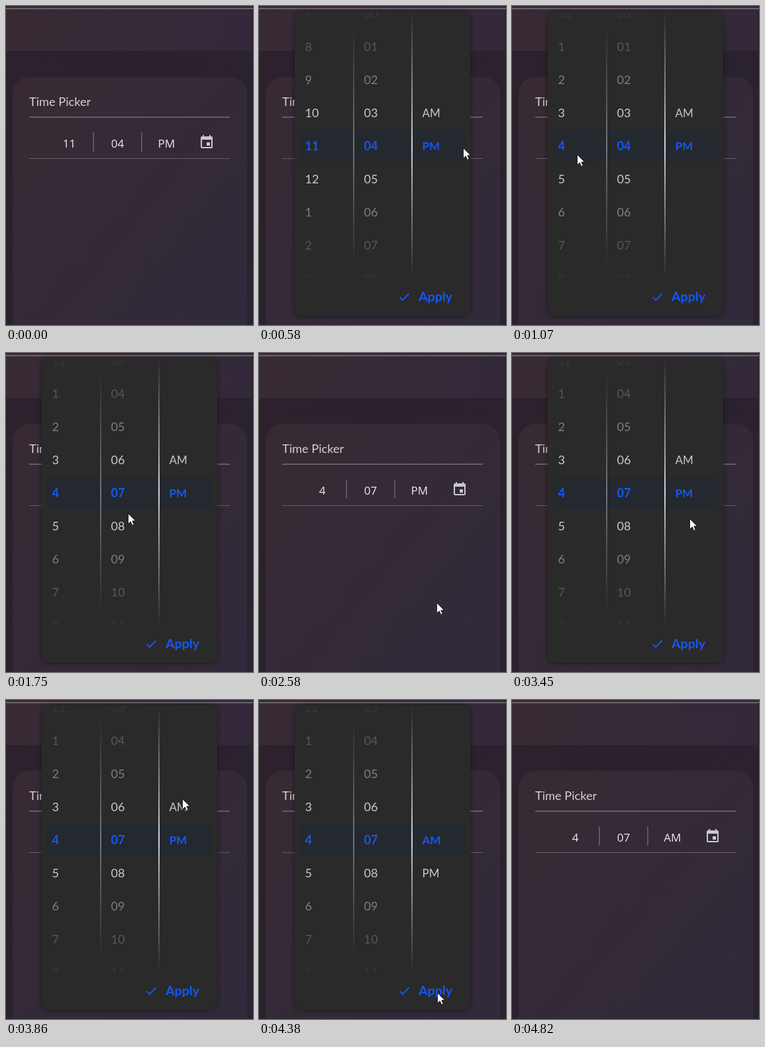
Animation of 373x482 px, one loop 5380 ms. Source, as an HTML page:

```html
<!DOCTYPE html>
<html lang="en">
<head>
<meta charset="utf-8">
<title>Time Picker</title>
<style>
html, body { margin: 0; width: 100%; height: 100%; overflow: hidden; background: #2a202c; }
svg { display: block; width: 373px; height: 482px; }
text { font-family: Lato, sans-serif; }
.field text { font: 17px "Open Sans", sans-serif; fill: #eeeaf0; text-anchor: middle; }
.wheel text { font-size: 18px; fill: #e4e4e4; }
.wheel text.on { font-weight: 700; fill: #1557f5; }
.wheel .half text { font-size: 17px; }
</style>
</head>
<body>
<svg viewBox="0 0 373 482">
  <defs>
    <linearGradient id="page" x2="1" y2="1">
      <stop stop-color="#2c212c"/><stop offset="1" stop-color="#2a2231"/>
    </linearGradient>
    <linearGradient id="bar" x2="1">
      <stop stop-color="#382b34"/><stop offset="1" stop-color="#33293a"/>
    </linearGradient>
    <linearGradient id="card" x2="1" y2="1">
      <stop stop-color="#372a33"/><stop offset="1" stop-color="#312a3b"/>
    </linearGradient>
    <linearGradient id="rule" x2="0" y2="1">
      <stop stop-color="#fff" stop-opacity="0"/>
      <stop offset=".5" stop-color="#fff"/>
      <stop offset="1" stop-color="#fff" stop-opacity="0"/>
    </linearGradient>
    <filter id="shade" x="-10%" y="-10%" width="120%" height="120%">
      <feDropShadow dx="0" dy="1" stdDeviation="4" flood-color="#000" flood-opacity=".45"/>
    </filter>
    <clipPath id="view"><rect x="54" y="11" width="265" height="400"/></clipPath>
  </defs>

  <rect width="373" height="482" fill="url(#page)"/>
  <rect width="371" height="68" fill="url(#bar)"/>
  <rect y="3" width="373" height="2" fill="#6b626c"/>
  <rect x="10" y="107" width="354" height="420" rx="26" fill="url(#card)"/>
  <text x="35" y="151" font-size="18.2" fill="#d6d0d4">Time Picker</text>
  <rect x="35" y="167" width="303" height="2" fill="#645b66"/>
  <rect x="35" y="230" width="303" height="1" fill="#665d68"/>
  <path d="M132 191v29M205 191v29" stroke="#5f5662" stroke-width="2"/>
  <g class="field">
    <text id="hour" x="95.5" y="214"></text>
    <text id="minute" x="168.5" y="214"></text>
    <text id="half" x="242.3" y="214"></text>
  </g>
  <path transform="translate(291 194)" fill="#cbc7d0" d="M17 12h-5v5h5zM16 1v2H8V1H6v2H5c-1.1 0-2 .9-2 2v14c0 1.1.9 2 2 2h14c1.1 0 2-.9 2-2V5c0-1.1-.9-2-2-2h-1V1zm3 18H5V8h14z"/>

  <g id="popup">
    <rect x="54" y="8" width="265" height="460" rx="10" fill="#292929" filter="url(#shade)"/>
    <rect x="62" y="187" width="250" height="49" rx="9" fill="#24292f"/>
    <rect x="142" y="28" width="2" height="365" fill="url(#rule)" opacity=".36"/>
    <rect x="230" y="9" width="2" height="402" fill="url(#rule)" opacity=".8"/>
    <g id="wheel" class="wheel" clip-path="url(#view)"></g>
    <path d="M212.5 440l4.5 4.5 9.5-10" fill="none" stroke="#1557f5" stroke-width="1.9"/>
    <text x="241" y="446" font-size="19.6" font-weight="700" fill="#1557f5">Apply</text>
  </g>
  <path id="cursor" d="M.5.5v15.8l3.7-3.5 2.5 5.6 2.6-1.1-2.5-5.5h4.9z" fill="#fff" stroke="#111" stroke-width=".9"/>
  <circle id="halo" r="15" fill="#ff0" fill-opacity=".5"/>
</svg>
<script>
const LOOP = 5380, ROW = 50, MID = 212;
const el = id => document.getElementById(id);
const smooth = p => p * p * (3 - 2 * p);
const easeIn = p => p * p;
const easeOut = p => p * (2 - p);
const within = (t, spans) => spans.some(([a, b]) => t >= a && t < b);
const show = (node, on) => node.setAttribute("visibility", on ? "visible" : "hidden");
const ramp = (t, a, b) => smooth(Math.min(1, Math.max(0, (t - a) / (b - a))));

// time, x, y, easing into the stop
const path = [
  [30, 346, 480], [460, 308, 214, easeOut], [580, 308, 214],
  [800, 98, 224], [1300, 98, 224], [1570, 184, 242], [1750, 184, 242],
  [1830, 195, 262], [2090, 279, 431], [2440, 279, 431],
  [2580, 268, 377, easeIn], [2850, 300, 206, easeOut], [2990, 300, 206],
  [3220, 268, 250], [3450, 268, 250], [3700, 266, 149], [3990, 266, 149],
  [4400, 269, 444], [4580, 269, 444], [4815, 334, 484, easeIn]
];
const open = [[575, 2440], [2985, 4570]];
const clicks = [[480, 570], [2320, 2410], [2880, 2970], [3730, 3840], [4430, 4540]];
const fade = [1, .86, .45, .24, .07, 0];

const hourText = n => String((n + 11) % 12 + 1);
const minuteText = n => String((n + 60) % 60).padStart(2, "0");
const halfText = n => ["AM", "PM"][n] || "";

function column(x, label, cls) {
  const group = document.createElementNS("http://www.w3.org/2000/svg", "g");
  group.setAttribute("class", cls);
  el("wheel").append(group);
  const rows = [];
  for (let i = -5; i <= 5; i++) {
    const row = document.createElementNS("http://www.w3.org/2000/svg", "text");
    row.setAttribute("x", x);
    group.append(row);
    rows.push(row);
  }
  return value => {
    const near = Math.round(value);
    rows.forEach((row, i) => {
      const n = near + i - 5, off = n - value;
      const d = Math.min(4.99, Math.abs(off)), k = Math.floor(d);
      row.textContent = label(n);
      row.setAttribute("y", MID + 6.3 + off * ROW);
      row.setAttribute("opacity", fade[k] + (fade[k + 1] - fade[k]) * (d - k));
      row.setAttribute("class", n === near ? "on" : "");
    });
  };
}
const setHour = column(69.5, hourText, "");
const setMinute = column(158.5, minuteText, "");
const setHalf = column(246.5, halfText, "half");

function pointer(t) {
  let i = 1;
  while (i < path.length - 1 && t > path[i][0]) i++;
  const [t0, x0, y0] = path[i - 1], [t1, x1, y1, ease = smooth] = path[i];
  const p = ease(Math.min(1, Math.max(0, (t - t0) / (t1 - t0))));
  return [x0 + (x1 - x0) * p, y0 + (y1 - y0) * p];
}

function draw(t) {
  const hour = 11 + 5 * ramp(t, 790, 1070);
  const minute = 4 + 3 * ramp(t, 1540, 1745);
  const half = t < 3885 ? 1 : 0;
  setHour(hour);
  setMinute(minute);
  setHalf(half);
  el("hour").textContent = hourText(Math.round(hour));
  el("minute").textContent = minuteText(Math.round(minute));
  el("half").textContent = halfText(half);
  show(el("popup"), within(t, open));

  const [x, y] = pointer(t);
  el("cursor").setAttribute("transform", `translate(${x} ${y})`);
  el("halo").setAttribute("transform", `translate(${x} ${y})`);
  show(el("cursor"), t >= 30 && t < 4815);
  show(el("halo"), within(t, clicks));
}

let start;
function tick(now) {
  start ??= now;
  draw((now - start) % LOOP);
  requestAnimationFrame(tick);
}
draw(0);
requestAnimationFrame(tick);
</script>
</body>
</html>
```
